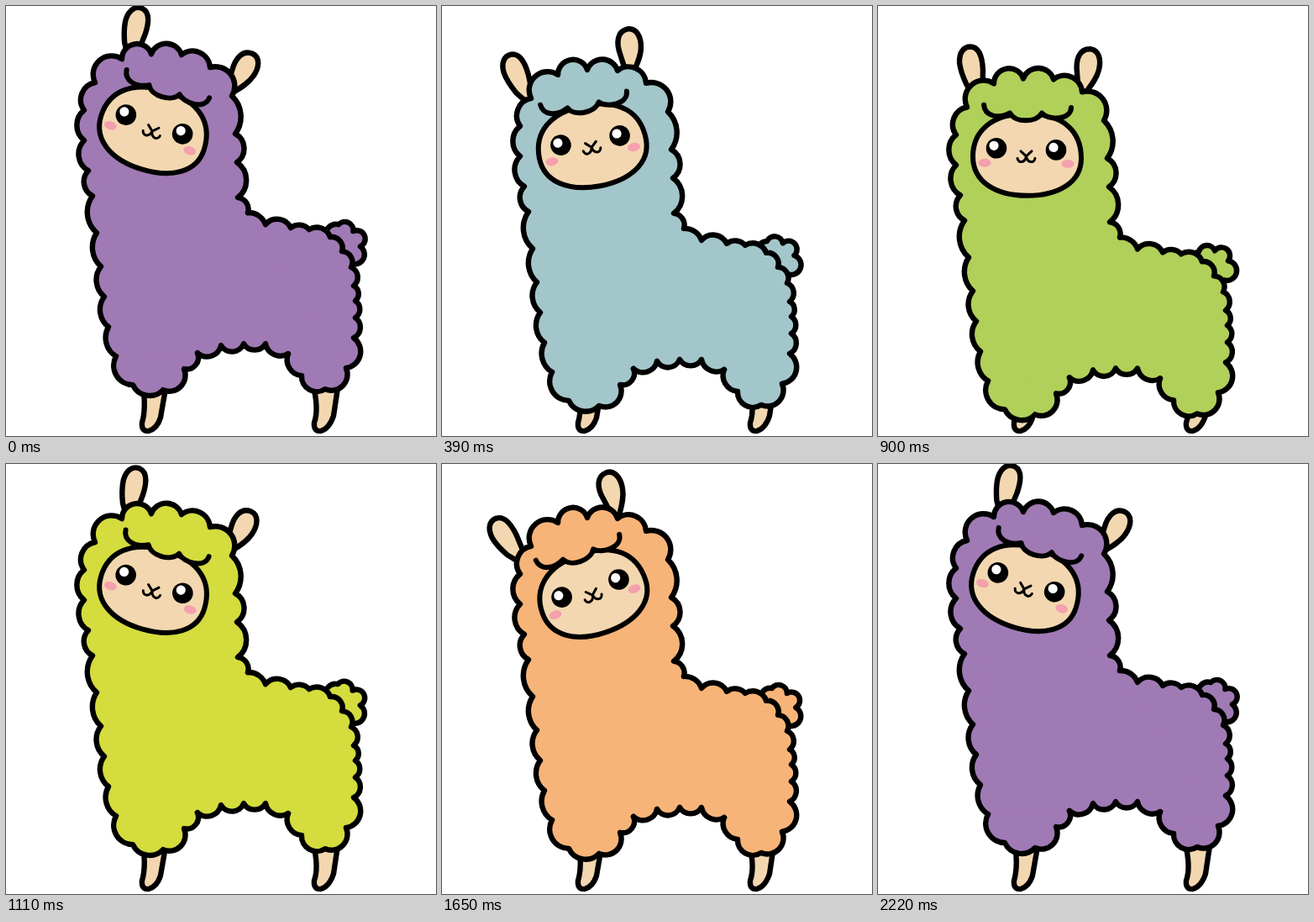
Animation, 512 px wide and 512 px high, one loop 2250 ms. Source, as an HTML page without scripts:

```html
<!DOCTYPE html>
<html lang="en">
<head>
<meta charset="utf-8">
<title>Dancing alpaca</title>
<style>
@property --tilt { syntax: "<number>"; inherits: true; initial-value: 0; }
@property --drop { syntax: "<number>"; inherits: true; initial-value: 0; }

html, body { margin: 0; width: 100%; height: 100%; overflow: hidden; background: #fff; }
svg {
  display: block; width: 100%; height: 100%;
  stroke: #000; stroke-width: 6.4; stroke-linecap: round; stroke-linejoin: round;
  animation: sway 2250ms linear infinite, bounce 2250ms linear infinite, rainbow 2250ms linear infinite;
}
.wool { fill: currentColor; }
.skin { fill: #f3d7b0; }
.core { stroke: currentColor; stroke-width: 2; }
.line { fill: none; }
.body { transform: translateY(calc(var(--drop) * 1px)); }
.tail { transform-origin: 395px 290px; transform: rotate(calc((29.5 - var(--drop)) * .95deg)); }
.ears { transform-origin: 180px 149px; transform: rotate(calc(var(--tilt) * 1.25deg + 1deg)); }
.face { transform-origin: 177px 141px; transform: rotate(calc(var(--tilt) * 1deg)); stroke-width: 6; }

@keyframes sway {
  0%, 98.67%, 100% { --tilt: 17.1; }
  17.33% { --tilt: -10.6; }
  25.5% { --tilt: -21.4; }
  40% { --tilt: 0; }
  50.1% { --tilt: 17.3; }
  58.67% { --tilt: 4; }
  73.33% { --tilt: -18.8; }
  76% { --tilt: -21.4; }
  82.67% { --tilt: -11.3; }
}
@keyframes bounce {
  0%, 25.5%, 50.1%, 76%, 98.67%, 100% { --drop: 0; }
  12.67% { --drop: 32; }
  17.33% { --drop: 19; }
  37.9% { --drop: 32.5; }
  40% { --drop: 29.5; }
  58.67% { --drop: 22; }
  62.9% { --drop: 32; }
  73.33% { --drop: 7; }
  82.67% { --drop: 18.6; }
  88% { --drop: 32; }
}
@keyframes rainbow {
  0%, 98.67%, 100% { color: #a07ab4; }
  17.33% { color: #a3c6ca; }
  40% { color: #b0d05a; }
  58.67% { color: #f8e822; }
  73.33% { color: #f7b478; }
  82.67% { color: #e698a8; }
}
</style>
</head>
<body>
<svg viewBox="0 0 512 512">
  <g class="skin">
    <path d="M163 450Q167 480 162 496Q161 507 170 506Q180 503 184 490L191 450"/>
    <path d="M365 448Q373 480 367 496Q366 507 375 506Q385 503 390 488L396 448"/>
  </g>
  <g class="body">
    <path class="wool tail" d="M376 283A12 12 0 0 1 382 263A10 10 0 0 1 401 262A10 10 0 1 1 417 274A11.8 11.8 0 1 1 412 297"/>
    <g class="skin ears">
      <path d="M120 88L104 66C99 56 96 48 95 40C94 27 100 20.5 108 20.5C118 21 122 32 123 48V80"/>
      <path d="M238 80L235 48C233 32 238 20.5 250 20.5C260 21 264 32 261 45C259 55 252 64 246 72"/>
    </g>
    <g class="wool">
      <path class="core" d="M106 91L288 245 405 431 336 414A18 18 0 0 1 309 402A15 15 0 0 1 283 402A15 15 0 0 1 256 404A17 17 0 0 1 228 413L131 417Z"/>
      <path class="left" d="M131 417A26 26 0 0 1 122 382A26 26 0 0 1 117 346A26 26 0 0 1 113 310A31 31 0 0 1 108 270A33 33 0 0 1 103 226A19 19 0 0 1 98 196A23 23 0 0 1 93 160A23 23 0 0 1 93 124A21 21 0 0 1 106 91"/>
      <path class="head" d="M106 91A22 22 0 0 1 138 63A18 18 0 0 1 173 57A19 19 0 0 1 209 58A21 21 0 0 1 243 73A23 23 0 0 1 269 107A34 34 0 0 1 273 152A20 20 0 0 1 275 186A26 26 0 0 1 276 228A14 14 0 0 1 288 246"/>
      <path class="back" d="M288 246A21 21 0 0 1 309 260A18 18 0 0 1 339 264A16 16 0 0 1 361 266A17 17 0 0 1 386 275A13 13 0 0 1 400 292A13 13 0 0 1 411 311A13 13 0 0 1 414 333A11 11 0 0 1 416 351A12 12 0 0 1 416 371A14 14 0 0 1 414 395A20 20 0 0 1 405 431"/>
      <path class="leg" d="M405 431A19 19 0 0 1 380 456A18 18 0 0 1 352 440A19 19 0 0 1 336 414"/>
      <path class="leg" d="M228 413A14 14 0 0 1 212 432A19 19 0 0 1 187 457A22 22 0 0 1 151 451A23 23 0 0 1 131 417"/>
      <path class="line" d="M336 414A18 18 0 0 1 309 402A15 15 0 0 1 283 402A15 15 0 0 1 256 404A17 17 0 0 1 228 413"/>
    </g>
    <g class="face">
      <path class="skin" d="M178 99C221 99 242 120 242 152C242 181 214 196.5 178 196.5C140 196.5 113 180 113 150C113 120 135 99 178 99Z"/>
      <path class="wool" d="M126 88.5C127 101 142 106 157 98C163 110 188 110 195 98C203 107 229 107 230 91.5"/>
      <g stroke="none">
        <g fill="#f4a0ae">
          <ellipse cx="127" cy="157.5" rx="7.5" ry="5"/>
          <ellipse cx="226" cy="158.5" rx="7.5" ry="5"/>
        </g>
        <circle cx="141" cy="140" r="12.3"/>
        <circle cx="212" cy="142" r="12.3"/>
        <g fill="#fff">
          <circle cx="138" cy="137" r="5.6"/>
          <circle cx="209" cy="139" r="5.6"/>
        </g>
      </g>
      <path class="line" stroke-width="3" d="M170 143.5L176.5 149.5 183 143.5M166 152C167 158 175 158 176.5 149.5C178 158 186 158 187 152"/>
    </g>
  </g>
</svg>
</body>
</html>
```
